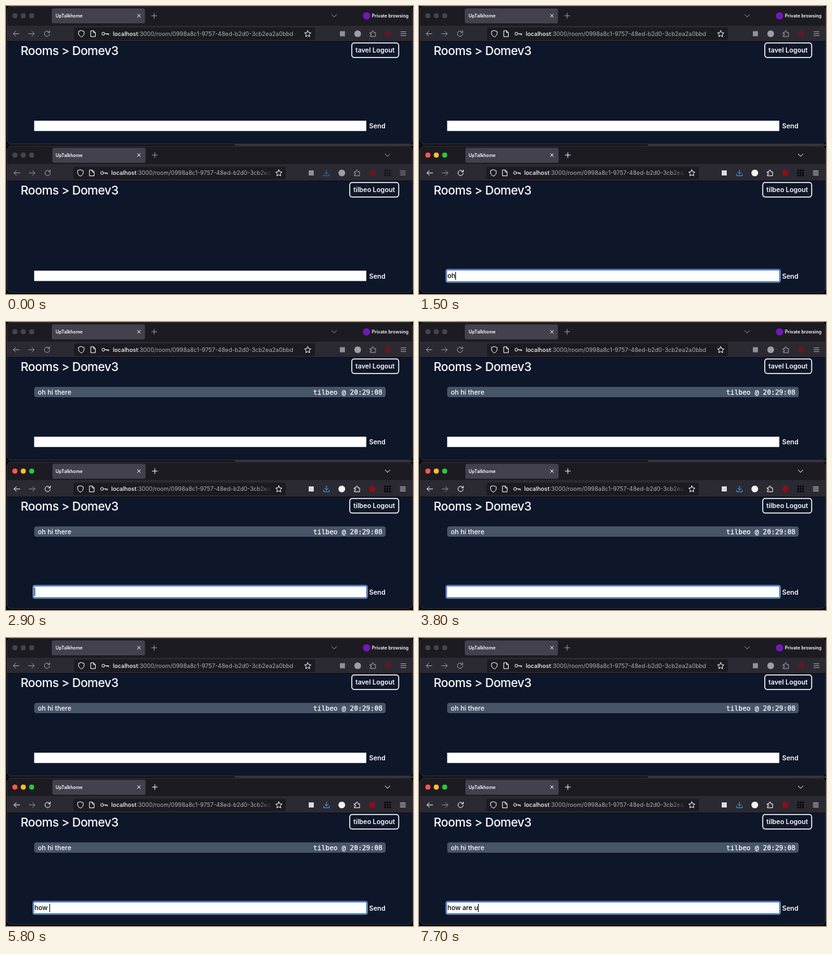
Write an HTML page that moves like this. It is 640 by 452 pixels and loops after 8000 ms.

```html
<!DOCTYPE html>
<html lang="en">
<head>
<meta charset="utf-8">
<title>Chat room</title>
<style>
  html, body { margin: 0; width: 100%; height: 100%; overflow: hidden; background: #020204; }
  svg { display: block; width: 640px; height: 452px; }
  text { font-family: Inter, sans-serif; fill: #fbfbfe; white-space: pre; }
  .small { font-size: 7.1px; font-weight: 600; }
  .url { font-size: 9.1px; fill: #aeadb5; }
  .url .host { fill: #fbfbfe; font-weight: 500; }
  .title { font-size: 19px; font-weight: 500; letter-spacing: -.5px; }
  .label { font-size: 10.35px; font-weight: 600; }
  .body { font-size: 10.4px; font-weight: 500; }
  .stamp { font-family: "DejaVu Sans Mono", monospace; font-size: 10.65px; text-anchor: end; stroke: #fbfbfe; stroke-width: .25; }
  .typed { font-size: 10.3px; font-weight: 500; fill: #000; }
  .line { fill: none; stroke: #fbfbfe; stroke-width: 1; stroke-linecap: round; stroke-linejoin: round; }
  .chrome { opacity: .58; }
  .on .chrome { opacity: 1; }
  .lamp { fill: #46454c; }
  .on .lamp { fill: var(--c); }
  .faint { opacity: .85; }
  .on .faint { opacity: .5; }
</style>
</head>
<body>
<svg id="stage" viewBox="0 0 640 452"></svg>
<script>
const LOOP = 8000;
const ROOM = "Rooms > Domev3";
const HOST = "localhost";
const PATH = ":3000/room/0998a8c1-9757-48ed-b2d0-3cb2ea2a0bbd";

// [time, input text, caret shown]
const STEPS = [
  [0, "", 0], [500, "", 1], [1000, "", 0], [1400, "o", 1], [1500, "oh", 1],
  [1600, "oh ", 1], [1700, "oh h", 1], [1800, "oh hi", 1], [1900, "oh hi ", 1],
  [2000, "oh hi th", 1], [2100, "oh hi the", 1], [2200, "oh hi ther", 1],
  [2300, "oh hi there", 1], [2800, "oh hi there", 0], [2900, "", 1], [3400, "", 0],
  [3900, "", 1], [4000, "h", 1], [4100, "ho", 1], [4600, "ho", 0], [5000, "ho", 1],
  [5500, "how", 1], [5600, "how ", 1], [6100, "how a", 1], [6200, "how ar", 1],
  [6300, "how are", 1], [6400, "how are ", 1], [6800, "how are u", 1],
  [7300, "how are u", 0], [7700, "how are u", 1]
];
const FOCUS = 500, SENT = 2900;

const rect = (x, y, w, h, fill, r = 0, more = "") =>
  `<rect x="${x}" y="${y}" width="${w}" height="${h}" rx="${r}" fill="${fill}" ${more}/>`;
const disc = (x, y, r, fill) => `<circle cx="${x}" cy="${y}" r="${r}" fill="${fill}"/>`;
const text = (x, y, cls, s) => `<text x="${x}" y="${y}" class="${cls}">${s.replace(">", "&gt;")}</text>`;
const icon = (x, y, d, more = "") =>
  `<path class="line" transform="translate(${x} ${y})" d="${d}" ${more}/>`;

const ICON = {
  close: "M-2.3-2.3 2.3 2.3M2.3-2.3-2.3 2.3",
  plus: "M-4 0H4M0-4V4",
  chevron: "M-3.8-1.8 0 2 3.8-1.8",
  back: "M4.5 0H-4.5M-.7-3.8-4.5 0-.7 3.8",
  forward: "M-4.5 0H4.5M.7-3.8 4.5 0 .7 3.8",
  reload: "M3.6-2.2A4.2 4.2 0 1 0 4.2.6M4.2-4.6V-1.7H1.3",
  shield: "M0-5 4.4-3.4V-.8C4.4 2 2.6 4 0 5-2.6 4-4.4 2-4.4-.8V-3.4Z",
  page: "M-3.4-4.6H.8L3.6-1.8V4.6H-3.4ZM.6-4.4V-1.6H3.4",
  key: "M-.6 0A2.3 2.3 0 1 1-5.2 0 2.3 2.3 0 1 1-.6 0H5.4V2M3 0V1.6",
  star: "M0-4.9 1.5-1.7 5-1.3 2.4 1.1 3.1 4.6 0 2.9-3.1 4.6-2.4 1.1-5-1.3-1.5-1.7Z",
  puzzle: "M-4.2-1.8H-1.6V-3.2A1.4 1.4 0 0 1 1.2-3.2V-1.8H4V4.4H-4.2V2.4H-3.2A1.2 1.2 0 0 0-3.2 0H-4.2Z",
  load: "M0-4.6V1.6M-2.7-1 0 1.7 2.7-1M-4.3 2V4.4H4.3V2",
  menu: "M-4-3H4M-4 0H4M-4 3H4"
};

function browser(o) {
  const { id, y, h, row, tabY, tab, nav, tools, box, body } = o;
  const lamps = ["#fe5850", "#febc2e", "#28c840"]
    .map((c, i) => `<circle class="lamp" style="--c:${c}" cx="${14 + 13.2 * i}" cy="${tabY}" r="4"/>`).join("");
  const at = i => tools + 24 * i;
  const extra = o.extra ? 1 : 0;
  let grid = "";
  if (extra) for (let i = 0; i < 9; i++)
    grid += rect(at(5) - 5.2 + 3.9 * (i % 3), row - 5.2 + 3.9 * Math.floor(i / 3), 2.7, 2.7, "#050507", .6);
  const menuX = at(4 + 2 * extra);
  return `<g id="${id}">
    <clipPath id="${id}Clip">${rect(1, y, 638.5, h, "#fff", 7)}</clipPath>
    <g clip-path="url(#${id}Clip)">
      ${rect(1, y, 639, h, "#1c1b22")}
      ${rect(1, o.toolbar, 639, body - o.toolbar, "#2b2a33")}
      ${rect(1, body, 639, y + h - body, "#0e1629")}
      ${rect(1, body - 1, 639, 1, "#0d0d13")}
    </g>
    ${rect(1.3, y + .4, 638, h - .8, "none", 7, 'stroke="#3d3d45" stroke-width=".8"')}
    ${lamps}
    ${rect(tab, tabY - 11.5, 146.5, 23.5, "#42414d", 3)}
    ${text(78, tabY + 2.7, "small", "UpTalkhome")}
    ${icon(209, tabY, ICON.close)}
    <g class="chrome">
      ${icon(tab + 161, tabY, ICON.plus)}
      ${icon(o.chevron, tabY, ICON.chevron)}
      ${icon(nav, row, ICON.back)}
      <g class="faint">${icon(nav + 24, row, ICON.forward)}</g>
      ${icon(nav + 48.5, row, ICON.reload)}
      ${rect(at(0) - 4, row - 4, 8, 8, "#dddce2")}
      ${extra ? icon(at(1), row, ICON.load, 'style="stroke:#45a5f5"') : ""}
      ${disc(at(1 + extra), row, 5.3, "#f4f4f7")}
      ${icon(at(2 + extra), row, ICON.puzzle)}
      ${disc(at(3 + extra), row, 5, "#8c0f18")}
      ${grid}
      ${icon(menuX, row, ICON.menu)}
    </g>
    ${rect(box[0], row - 9.7, box[1] - box[0], 19.6, "#1c1b22", 3)}
    ${icon(o.marks[0], row, ICON.shield)}
    ${icon(o.marks[1], row, ICON.page)}
    ${icon(o.marks[2], row, ICON.key)}
    <g ${extra ? 'mask="url(#fade)"' : ""}>
      <text class="url" x="${o.urlX}" y="${row + 3.3}"><tspan class="host">${HOST}</tspan>${PATH}</text>
    </g>
    ${icon(o.marks[3], row, ICON.star)}
    ${text(23, body + 20.8, "title", ROOM)}
    ${rect(o.button, body + 1.9, 617.5 - o.button, 22.9, "none", 4, 'stroke="#fff" stroke-width="1.5"')}
    ${text(o.button + 5.8, body + 16.9, "label", o.user + " Logout")}
    <g class="message" visibility="hidden">
      ${rect(44.3, body + 45.8, 552.7, 16.3, "#475569", 4)}
      ${text(50, body + 57.8, "body", "oh hi there")}
      ${text(592, body + 57.8, "stamp", "tilbeo @ 20:29:08")}
    </g>
    ${rect(44.3, o.input, 522.2, 16.2, "#fff")}
    ${text(571, o.input + 12.2, "label", "Send")}
  </g>`;
}

const stage = document.getElementById("stage");
stage.innerHTML = `
  <defs>
    <linearGradient id="fadeOut" gradientUnits="userSpaceOnUse" x1="396" x2="419">
      <stop offset="0" stop-color="#fff"/><stop offset="1" stop-color="#000"/>
    </linearGradient>
    <mask id="fade" maskUnits="userSpaceOnUse" x="100" y="240" width="319" height="40">
      ${rect(100, 240, 319, 40, "url(#fadeOut)")}
    </mask>
  </defs>
  ${rect(0, 0, 640, 452, "#020204")}
  ${rect(0, 217, 640, 2.5, "#101116")}
  ${rect(360, 217, 280, 2.5, "#36373d")}
  ${browser({
    id: "upper", y: 0, h: 217, tabY: 15.3, toolbar: 31, row: 43.5, body: 56,
    tab: 72, chevron: 516, nav: 16, tools: 529, box: [107, 486],
    marks: [118.5, 137, 156, 474.5], urlX: 168, button: 543.7, user: "tavel", input: 180
  })}
  ${disc(567, 15.5, 5.8, "#7317b8")}
  ${text(575.3, 18, "small", "Private browsing")}
  ${browser({
    id: "lower", y: 219.6, h: 230.4, tabY: 234, toolbar: 248, row: 262, body: 275,
    tab: 73, chevron: 600, nav: 17, tools: 480, box: [106, 440], extra: true,
    marks: [117, 135, 154, 429], urlX: 165.5, button: 540.5, user: "tilbeo", input: 415.4
  })}
  <g id="field">
    ${rect(42.4, 413.3, 525.8, 20.4, "none", 2.5, 'stroke="#d5e3f8" stroke-width=".9"')}
    ${rect(43.4, 414.3, 523.8, 18.4, "#fff", 1.5, 'stroke="#2268cf" stroke-width="1.3"')}
    <text id="typed" class="typed" x="44.7" y="427.4"></text>
    <rect id="caret" y="417" width="1" height="13" fill="#000"/>
  </g>`;

const find = id => document.getElementById(id);
const lower = find("lower"), field = find("field"), typed = find("typed"), caret = find("caret");
const messages = document.querySelectorAll(".message");
const show = (el, on) => el.setAttribute("visibility", on ? "visible" : "hidden");
let shown = -1;

function draw(t) {
  let i = STEPS.length - 1;
  while (STEPS[i][0] > t) i--;
  if (i === shown) return;
  shown = i;
  const [, value, blink] = STEPS[i];
  lower.setAttribute("class", t >= FOCUS ? "on" : "");
  show(field, t >= FOCUS);
  messages.forEach(m => show(m, t >= SENT));
  typed.textContent = value;
  caret.setAttribute("x", 44.7 + (value ? typed.getComputedTextLength() : 0));
  show(caret, blink && t >= FOCUS);
}

const start = performance.now();
function tick() {
  draw((performance.now() - start) % LOOP);
  requestAnimationFrame(tick);
}
tick();
</script>
</body>
</html>
```
